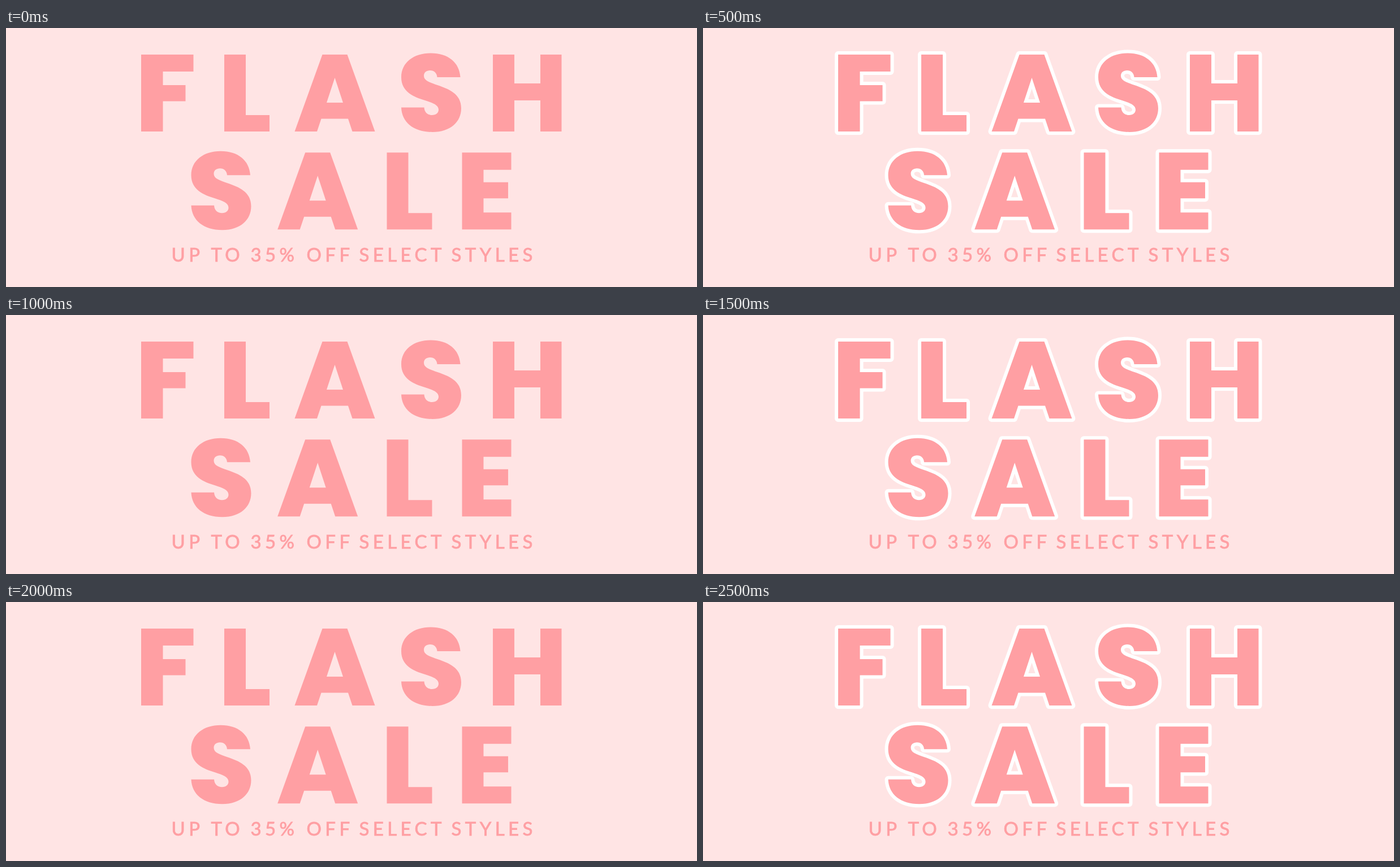
An HTML page for the animation above (3 s loop, 1222 by 458 pixels).

```html
<!DOCTYPE html>
<html lang="en">
<head>
<meta charset="utf-8">
<title>Flash sale</title>
<style>
  html, body { margin: 0; width: 100%; height: 100%; overflow: hidden; background: #ffe4e4; }
  svg { display: block; width: 100%; height: 100%; }
  .fill { fill: #ff9fa3; }
  .outline { fill: #fff; stroke: #fff; stroke-width: 12; stroke-linejoin: round; }
  .tagline {
    font: 400 33px Lato, "Open Sans", sans-serif;
    letter-spacing: 6.4px;
    fill: #ff9fa3; stroke: #ff9fa3; stroke-width: .8;
  }
</style>
</head>
<body>
<svg viewBox="0 0 1222 458">
  <defs>
    <path id="L" d="M0 0H38V107H80V136H0Z"/>
    <path id="A" fill-rule="evenodd" d="M0 136L49 0H93L142 136H102L94.5 113.5H47L39.5 136ZM71 41L85.5 85H56.5Z"/>
    <path id="S" d="M104.500 40C103 14 83 -2.500 52 -2.500C22 -2.500 0 14 0 40C0 66 22 75 42 81C56 85.500 66 89 66 97.500C66 103 61.500 107 54.500 107C46.500 107 41 102 40.500 93.500H0C1 120 22 137 55 137C87 137 106 119 106 95C106 69 84 61 64 54C50 49 40 46 40 37.500C40 31.500 44.500 28 51 28C58 28 63 32.500 63.500 40Z"/>
    <path id="F" d="M0 0H92.500V30H38.500V54H78.500V82.500H38.500V136H0Z"/>
    <path id="H" d="M0 0H38V51H84V0H121.500V136H84V81H38V136H0Z"/>
    <path id="E" d="M0 0H87V30.500H38V52.500H81.500V81H38V106H87V136H0Z"/>
    <g id="headline">
      <use href="#F" x="239" y="47"/>
      <use href="#L" x="386" y="47"/>
      <use href="#A" x="510.500" y="47"/>
      <use href="#S" x="699" y="47"/>
      <use href="#H" x="861" y="47"/>
      <use href="#S" x="327.500" y="220.300"/>
      <use href="#A" x="480.200" y="220.200"/>
      <use href="#L" x="673.500" y="220.200"/>
      <use href="#E" x="806.500" y="220.200"/>
    </g>
  </defs>
  <use id="glow" class="outline" href="#headline" opacity="0"/>
  <use class="fill" href="#headline" role="img" aria-label="FLASH SALE"/>
  <g class="tagline">
    <text x="292.500" y="413">UP</text>
    <text x="362.500" y="413">TO</text>
    <text x="432.500" y="413">35%</text>
    <text x="531.500" y="413">OFF</text>
    <text x="624.500" y="413">SELECT</text>
    <text x="787.500" y="413">STYLES</text>
  </g>
</svg>
<script>
  // The white outline blinks: half a second off, half a second on.
  const blink = [
    { opacity: 0, offset: 0, easing: "step-end" },
    { opacity: 1, offset: 0.5, easing: "step-end" },
    { opacity: 1, offset: 1 }
  ];
  document.getElementById("glow").animate(blink, { duration: 1000, iterations: Infinity });
</script>
</body>
</html>
```
